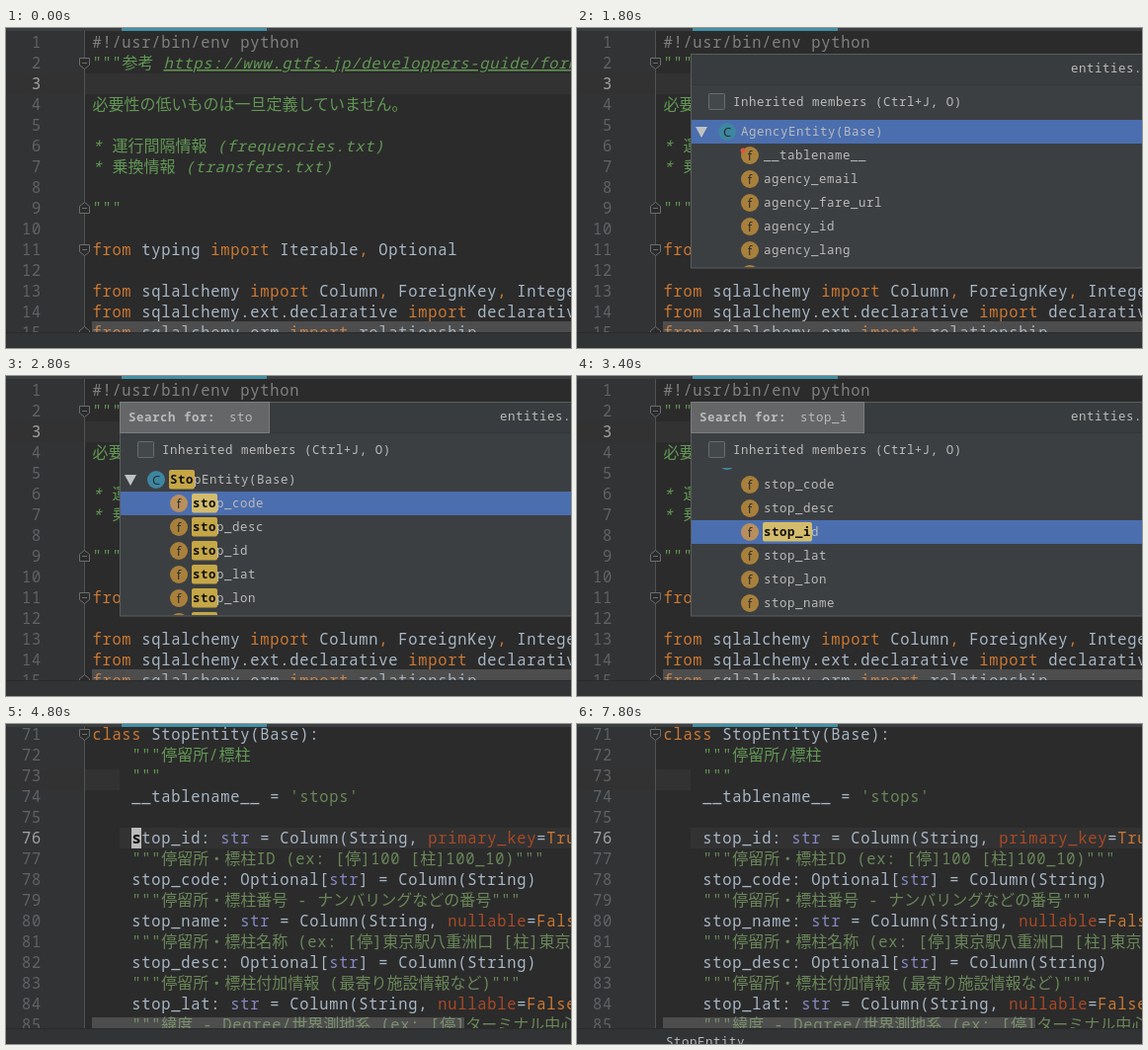
Recreate the animation shown at these times as an HTML page. Size 572x324 px, loop 8 s.

```html
<!DOCTYPE html>
<html lang="ja">
<head>
<meta charset="utf-8">
<title>File structure search</title>
<style>
html, body { margin: 0; width: 100%; height: 100%; overflow: hidden; background: #2b2b2b; }
svg { display: block; }
text { white-space: pre; fill: #a9b7c6; font-family: "Noto Sans Mono", "Noto Sans Mono CJK JP", monospace; }
.code { font-size: 15.4px; letter-spacing: .76px; }
.ui { font-size: 12.4px; letter-spacing: .56px; fill: #bbbbbb; }
.cjk { font: 16px "Noto Sans CJK JP", "Noto Sans CJK", sans-serif; letter-spacing: 0; }
.icon { font: 13px "Open Sans", sans-serif; text-anchor: middle; fill: #25292b; }
.k { fill: #cc7832; }
.c { fill: #808080; }
.q, .d, .u { fill: #629755; }
.d, .u { font-style: italic; }
.u { text-decoration: underline; }
.s { fill: #6a8759; }
.b { fill: #8888c6; }
.a { fill: #aa4926; }
.num { fill: #606366; text-anchor: end; }
.now { fill: #a4a3a3; }
.hit { fill: #111111; font-weight: bold; }
</style>
</head>
<body>
<svg id="stage" width="572" height="324" viewBox="0 0 572 324">
  <defs><clipPath id="edit"><rect y="3" width="572" height="305.5"/></clipPath>
  <clipPath id="tree"><rect x="116" y="93" width="456" height="149"/></clipPath></defs>
  <rect width="572" height="324" fill="#2b2b2b"/>
  <g id="page"></g>
  <rect width="572" height="3" fill="#3c3f41"/>
  <rect x="117" width="147" height="3" fill="#4390a5"/>
  <rect y="308.5" width="572" height="15.5" fill="#313335"/>
  <path d="M0 308.5H572" stroke="#282a2b"/>
  <text id="crumb" class="ui" x="90" y="326">StopEntity</text>
  <g id="popup"></g>
</svg>
<script>
const $ = id => document.getElementById(id);
const UI = 8, ROW = 21, BASE = 16;

const esc = s => s.replace(/&/g, '&amp;').replace(/</g, '&lt;');
const rect = (x, y, w, h, fill, more = '') =>
  `<rect x="${x}" y="${y}" width="${w}" height="${h}" fill="${fill}" ${more}/>`;
const text = (x, y, s, cls) => `<text x="${x}" y="${y}" class="${cls}">${s}</text>`;

// Full-width characters use their own face and size.
const mixed = s => s.split(/([\u3000-\u30ff\u4e00-\u9fff]+)/)
  .map((part, i) => i % 2 ? `<tspan class="cjk">${part}</tspan>` : esc(part)).join('');

// Markup: "{k:word}" colours a word with class k.
const paint = line => line.split(/(\{[a-z]:[^}]*\})/).map(part => {
  const m = /^\{([a-z]):(.*)\}$/.exec(part);
  return m ? `<tspan class="${m[1]}">${mixed(m[2])}</tspan>` : mixed(part);
}).join('');

const column = (name, arg, value) =>
  `    ${name}: {b:str} = Column(String, {a:${arg}}={k:${value}})`;

const head = {
  top: 4, first: 1, current: 3, bar: 485,
  marks: [[0, 46, 572]],
  folds: [[2, 1], [9, -1], [11, 1], [15, -1]],
  lines: [
    '{c:#!/usr/bin/env python}',
    '{q:"""参考 }{u:https://www.gtfs.jp/developpers-guide/format}',
    '',
    '{q:必要性の低いものは一旦定義していません。}',
    '',
    '{d:* 運行間隔情報 (frequencies.txt)}',
    '{d:* 乗換情報 (transfers.txt)}',
    '',
    '{q:"""}',
    '',
    '{k:from} typing {k:import} Iterable{k:,} Optional',
    '',
    '{k:from} sqlalchemy {k:import} Column{k:,} ForeignKey{k:,} Integer',
    '{k:from} sqlalchemy.ext.declarative {k:import} declarative_base',
    '{k:from} sqlalchemy.orm {k:import} relationship'
  ]
};

const stops = {
  top: 0, first: 71, current: 76, bar: 377,
  marks: [[0, 46, 115], [115, 105, 457]],
  folds: [[71, 1]],
  lines: [
    '{k:class} StopEntity(Base):',
    '    {q:"""停留所/標柱}',
    '    {q:"""}',
    "    __tablename__ = {s:'stops'}",
    '',
    column('stop_id', 'primary_key', 'True'),
    '    {s:"""停留所・標柱ID (ex: [停]100 [柱]100_10)"""}',
    '    stop_code: Optional[{b:str}] = Column(String)',
    '    {s:"""停留所・標柱番号 - ナンバリングなどの番号"""}',
    column('stop_name', 'nullable', 'False'),
    '    {s:"""停留所・標柱名称 (ex: [停]東京駅八重洲口 [柱]東京駅八重洲口)"""}',
    '    stop_desc: Optional[{b:str}] = Column(String)',
    '    {s:"""停留所・標柱付加情報 (最寄り施設情報など)"""}',
    column('stop_lat', 'nullable', 'False'),
    '    {s:"""緯度 - Degree/世界測地系 (ex: [停]ターミナル中心)"""}'
  ]
};

function drawPage(p, caret) {
  const top = n => p.top + (n - p.first) * ROW;
  const y = top(p.current);
  let out = rect(0, 0, 80, 324, '#313335') +
    p.marks.map(([x, my, w]) => rect(x, my, w, ROW, '#323232')).join('') +
    '<path d="M79.5 0V324" stroke="#505253"/>';
  p.lines.forEach((line, i) => {
    const n = p.first + i, base = top(n) + BASE;
    out += text(36, base, n, 'code num' + (n === p.current ? ' now' : ''));
    out += text(87.4, base, paint(line), 'code');
  });
  for (const [n, dir] of p.folds)
    out += `<g transform="translate(79.5 ${top(n) + 10.5})" stroke="#6b6d6e" fill="#2b2b2b">
      <path d="M-5 -5H5V2L0 6L-5 2Z" transform="scale(1 ${dir})"/><path d="M-2.5 0H2.5"/></g>`;
  if (caret) {
    const x = p === head ? 87 : 127;
    out += rect(x, y, 10, ROW, '#bbbbbb');
    if (p === stops) out += text(x + .4, y + BASE, 's', 'code hit');
  }
  out += rect(87, 297, p.bar, 11.5, '#a6a6a6', 'opacity=".28"');
  return `<g clip-path="url(#edit)">${out}</g>`;
}

const list = s => s.split(' ');
const cls = name => name + 'Entity(Base)';
const stopRows = list('stop_code stop_desc stop_id stop_lat stop_lon stop_name stop_timezone');
const matches = [cls('Stop'), 'stop_id', 'stop_timezone', cls('StopTime'), 'stop_headsign', 'stop_id'];

// [start, query, selected row, centre of first row, rows]
const views = [
  [1800, '', 0, 105, [cls('Agency'), ...list('__tablename__ agency_email agency_fare_url agency_id agency_lang agency_name')]],
  [2200, 's', 3, 86, [...list('date date_id exception_type service_id'), cls('Calendar'), ...list('__tablename__ dates')]],
  [2400, 's', 2, 105, ['Base', cls('CalendarDate'), 'service_id', cls('Calendar'), ...list('dates saturday service_id')]],
  [2600, 'st', 1, 105, [cls('Calendar'), 'start_date', cls('Stop'), ...stopRows.slice(0, 4)]],
  [2800, 'sto', 1, 105, [cls('Stop'), ...stopRows.slice(0, 6)]],
  [3200, 'stop_', 1, 86, [cls('Stop'), ...stopRows]],
  [3400, 'stop_i', 3, 86, [cls('Stop'), ...stopRows]],
  [3600, 'stop_i', 1, 105, matches],
  [3800, 'stop_id', 1, 105, matches],
  [4000, 'stop_id', 1, 105, [cls('Stop'), 'stop_id', cls('StopTime'), 'stop_id']]
];

function drawRow(name, y, query, on) {
  const isClass = name.includes('('), isVar = name === 'Base';
  const ix = isClass || isVar ? 152 : 175, x = ix + 14, base = y + 4;
  const fill = isClass ? '#3d86a0' : on ? '#b98f5c' : '#a8803c';
  let out = on ? rect(116, y - 12, 456, 24, '#4b6eaf') : '';
  if (isClass) out += `<path d="M120 ${y - 5}H132L126 ${y + 6}Z" fill="#bfc1c2"/>`;
  out += `<circle cx="${ix}" cy="${y}" r="9" fill="${fill}"/>` +
    text(ix, y + 4.5, isClass ? 'C' : isVar ? 'V' : 'f', 'icon');
  if (name === '__tablename__') out += `<circle cx="168" cy="${y - 5}" r="2.5" fill="#e05540"/>`;
  const at = query ? name.toLowerCase().indexOf(query) : -1;
  if (at < 0) return out + text(x, base, name, 'ui');
  const end = at + query.length, hx = x + at * UI;
  return out + rect(hx - 1, y - 10, query.length * UI + 2, 19.5, on ? '#d3bc6b' : '#c6a746', 'rx="2"') +
    text(x, base, name.slice(0, at), 'ui') + text(hx, base, name.slice(at, end), 'ui hit') +
    text(x + end * UI, base, name.slice(end), 'ui');
}

function drawPopup([, query, sel, first, rows]) {
  let out = rect(115.5, 26.5, 470, 216.5, '#3c3f41', 'stroke="#5b5e60"') +
    rect(116, 27, 456, 30.5, '#393c3e') + '<path d="M116 57.5H572" stroke="#333638"/>' +
    text(500, 45, 'entities.py', 'ui') +
    rect(133.5, 66.5, 16, 16, '#43494a', 'stroke="#6b6b6b" rx="1"') +
    text(158, 79, 'Inherited members (Ctrl+J, O)', 'ui');
  if (query)
    out += rect(115.5, 26.5, 127 + query.length * UI, 31, '#656667', 'stroke="#7c7d7e"') +
      text(124, 46, 'Search for:', 'ui" font-weight="bold') + text(226, 46, query, 'ui');
  return out + '<g clip-path="url(#tree)">' +
    rows.map((r, i) => drawRow(r, first + i * 24, query, i === sel)).join('') + '</g>';
}

const within = (t, spans) => spans.some(([a, b]) => t >= a && t < b);
const blink = [[600, 1200], [1600, 1800], [4800, 5800], [6400, 6800], [7400, 7800]];
let shown = '';

function update(t) {
  const page = t < 4800 ? head : stops, caret = within(t, blink);
  const open = t >= 1800 && t < 4800;
  const view = open ? views.filter(v => v[0] <= t).pop() : null;
  const key = [page.first, caret, view && view[0], t >= 5000].join();
  if (key === shown) return;
  shown = key;
  $('page').innerHTML = drawPage(page, caret);
  $('popup').innerHTML = view ? drawPopup(view) : '';
  $('crumb').style.display = t >= 5000 ? '' : 'none';
}

const start = performance.now();
function tick() {
  update((performance.now() - start) % 8000);
  requestAnimationFrame(tick);
}
tick();
</script>
</body>
</html>
```
